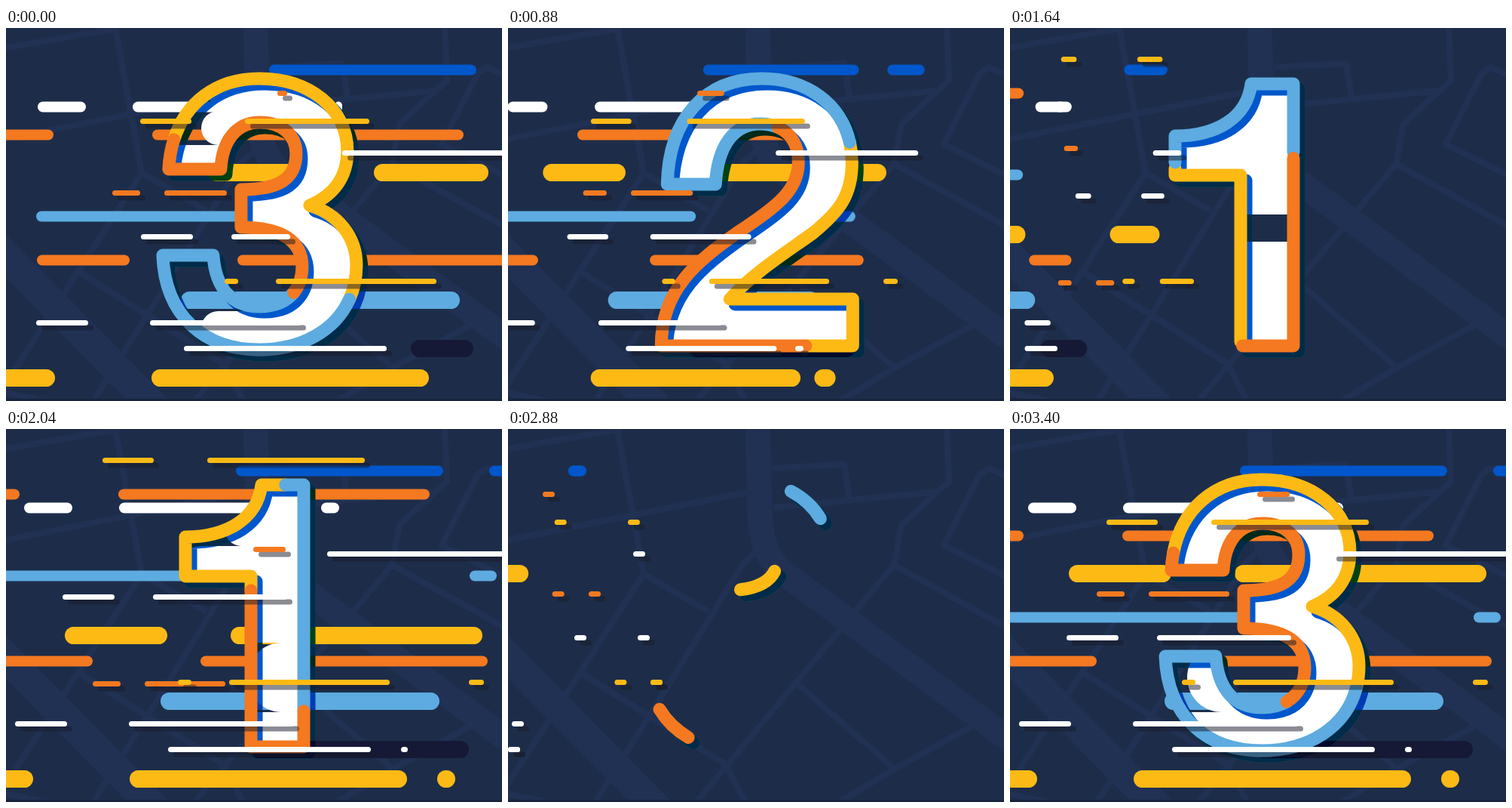
An HTML page with a canvas for the animation above (3440 ms loop, 658 by 494 pixels).

```html
<!DOCTYPE html>
<html lang="en">
<head>
<meta charset="utf-8">
<title>Countdown</title>
<style>
  html, body { margin: 0; width: 100%; height: 100%; overflow: hidden; background: #1d2d49; }
  canvas { display: block; width: 100vw; height: 100vh; }
</style>
</head>
<body>
<canvas id="stage" width="658" height="494"></canvas>
<script>
const W = 658, H = 494, STEP = 40, COUNT = 86;
const ctx = document.getElementById('stage').getContext('2d');

const NAVY = '#1d2d49', ROAD = '#203154', INK = '#161936';
const WHITE = '#ffffff', YELLOW = '#fdba15', ORANGE = '#f47920', SKY = '#5dabe0', BLUE = '#0057cb';
const THIN = 7, MID = 14, FAT = 23;

// Street map
const LANES = new Path2D(
  'M-5 27L150 0M145 0L180 192L266 242M-5 148L316 84M350 52L446 47L453 92' +
  'M352 104L570 83L585 70L582 -5M570 83L522 127L512 180L660 262' +
  'M512 180L250 494M660 195L578 154L626 60L638 52L660 62' +
  'M382 336L513 450L440 494M513 450L615 394M180 192L-4 476' +
  'M92 320L288 444L318 500M330 162L312 178L200 360L112 500M-5 482L60 496');
const AVENUE = new Path2D('M331 -5L334 110Q336 165 362 188L670 415');
const HIGHWAY = new Path2D('M-20 282L205 510');

// Numerals: outline, middle frame of its life, offset, where the first stroke starts
const DIGITS = [
  { mid: -1, dx: -2, base: -0.155, order: [YELLOW, SKY, ORANGE], lead: 0,
    d: 'M216 187C219 120 262 67 336 67C402 67 453 106 453 163C453 198 434 222 403 235' +
       'C440 246 465 276 465 314C465 382 410 426 336 426C262 426 211 380 208 301L275 301' +
       'C278 345 300 369 336 369C372 369 393 348 393 316C393 282 366 264 312 264L312 214' +
       'C362 214 385 200 385 166C385 141 365 125 337 125C305 125 287 150 285 187Z' },
  { mid: 25, dx: -10, base: 0.086, order: [YELLOW, ORANGE, SKY], lead: 0,
    d: 'M227 207C229 120 277 67 352 67C425 67 472 115 472 178C472 222 455 243 421 271' +
       'C385 297 340 325 310 359L473 359L473 421L219 421C219 345 268 308 320 271' +
       'C374 236 401 214 401 178C401 147 382 127 350 127C316 127 294 155 291 207Z' },
  { mid: 51, dx: 0, base: 0.473, order: [YELLOW, SKY, ORANGE], lead: 85, alt: true,
    d: 'M395 74L395 421L325 421L325 195L238 195L238 143C292 143 333 120 339 74Z' }
];
for (const g of DIGITS) {
  const p = document.createElementNS('http://www.w3.org/2000/svg', 'path');
  p.setAttribute('d', g.d);
  g.len = p.getTotalLength();
  g.path = new Path2D(g.d);
}

// The white fill slides through in bands, each with its own head start
const BAND_EDGES = [66, 110, 155, 247, 283, 375, 420];
const BAND_LEADS = [215, 205, 130, 62, 235, 205];

// Speed lines. bars: ends in the middle frame; from: where the dash is born;
// afterwards it runs v * k^p to the right, and no head passes stop
const ROWS = [];
function row(h, color, y, from, v, p, bars, stop = 1e4, alt = y) {
  const long = bars.reduce((a, b) => b[1] - b[0] > a[1] - a[0] ? b : a);
  for (const b of bars) b.push(from + 0.7 * Math.min(0, b[0] - long[0]));
  ROWS.push({ h, color, y, v, p, bars, stop, alt });
}
row(MID, BLUE, 55, 136, 44, 0.7, [[305, 580], [641, 700]]);
row(MID, WHITE, 104, 22, 18, 1.1, [[24, 88], [150, 360], [418, 442]], 446);
row(MID, ORANGE, 141, -60, 45, 1, [[-117, 18], [149, 562]], 1e4, 86);
row(FAT, YELLOW, 191, 116, 190, 0.47, [[78, 214], [298, 632]], 640, 273);
row(MID, SKY, 249, -70, 53, 1, [[-265, -165], [-13, 360], [615, 651]], 1e4, 194);
row(MID, ORANGE, 307, 2, 49, 1.35, [[-8, 115], [258, 639]]);
row(FAT, SKY, 360, -60, 27, 1.6, [[205, 575]], 602);
row(FAT, INK, 424, 12, 212, 0.5, [[325, 614]], 620);
row(FAT, YELLOW, 463, -35, 29, 1.55, [[-91, 36], [164, 532], [572, 596]], 597);
row(THIN, ORANGE, 86, 46, 32, 1, [[328, 371]], 373, 159);
row(THIN, YELLOW, 123, 159, 50, 0.9, [[128, 196], [267, 476]], 482, 41);
row(THIN, WHITE, 165, 166, 20, 1.6, [[426, 680]]);
row(THIN, ORANGE, 218, 107, 26, 0.7, [[115, 152], [184, 291]], 293, 337);
row(THIN, WHITE, 276, 172, 104, 0.35, [[75, 144], [195, 373]], 377, 222);
row(THIN, YELLOW, 335, 189, 62, 0.42, [[228, 246], [296, 509], [614, 634]], 640);
row(THIN, WHITE, 390, 5, 28, 1.3, [[12, 81], [163, 382]], 391);
row(THIN, WHITE, 424, 0, 21, 1.55, [[215, 484], [524, 533]], 505);

const smooth = v => (v = Math.max(0, Math.min(1, v))) * v * (3 - 2 * v);

function pill(x0, x1, y, h, color) {
  if (x1 - x0 < 2) return;
  ctx.fillStyle = color;
  ctx.beginPath();
  ctx.roundRect(x0, y - h / 2, x1 - x0, h, Math.min(h, x1 - x0) / 2);
  ctx.fill();
}

// Ends of one bar: a drifting dash, then growth, then the run to the right
function span(r, [x0, x1, from], k) {
  if (k > 0) {
    const run = r.v * k ** r.p + 60 * Math.max(0, k - 5);
    return [x0 + run, Math.min(x1 + run, Math.max(x1, r.stop))];
  }
  const dash = Math.max(16, 1.7 * r.h);
  const u = Math.max(0, (k + 11) / 11);
  const slide = 4 * (r.h - THIN) * Math.min(0, k + 11);
  return [from + (x0 - from) * u + slide, from + dash + (x1 - from - dash) * u + slide];
}

function drawBars(g, k, thin) {
  for (const r of ROWS) {
    if ((r.h === THIN) !== thin) continue;
    const y = g.alt ? r.alt : r.y;
    const ends = r.bars.map(b => span(r, b, k));
    if (thin) for (const [a, b] of ends) pill(a + 7, b + 7, y + 7, r.h, 'rgba(25,27,40,.5)');
    for (const [a, b] of ends) pill(a, b, y + 0.5, r.h, r.color);
  }
}

function road(path, width) {
  ctx.lineWidth = width;
  ctx.stroke(path);
}

function drawMap() {
  ctx.fillStyle = NAVY;
  ctx.fillRect(0, 0, W, H);
  ctx.strokeStyle = ROAD;
  ctx.lineJoin = 'round';
  road(LANES, 8);
  road(AVENUE, 33);
  road(HIGHWAY, 40);
  ctx.fillStyle = '#18243d';
  ctx.fillRect(0, 491, W, 3);
}

// Three dashes share the outline and travel clockwise; a tint draws all three at once
function outline(g, k, off, tint) {
  const grow = smooth((k + 13.8) / 4.2) * (1 - smooth((k - 4.4) / 4));
  if (grow <= 0) return;
  const turn = g.base + 0.42 * (1 - Math.exp(-(k + 12.8) / 8));
  const third = g.len / 3, len = third * grow;
  ctx.save();
  ctx.translate(g.dx + 1.9 * k + off, off);
  ctx.lineWidth = 17;
  ctx.lineCap = ctx.lineJoin = 'round';
  ctx.setLineDash([len, (tint ? third : g.len) - len]);
  for (const color of tint ? [tint] : [YELLOW, SKY, ORANGE]) {
    const mid = turn + (tint ? 0 : g.order.indexOf(color) / 3);
    ctx.lineDashOffset = len / 2 - mid * g.len;
    ctx.strokeStyle = color;
    ctx.stroke(g.path);
  }
  ctx.restore();
}

function drawFill(g, k) {
  if (k < -12 || k > 9) return;
  const shift = g.dx + 1.9 * k;
  ctx.save();
  ctx.translate(shift, 0);
  ctx.clip(g.path);
  ctx.translate(-shift, 0);
  BAND_LEADS.forEach((lead, i) => {
    const top = BAND_EDGES[i], bottom = BAND_EDGES[i + 1];
    const tail = lead + g.lead + 54 * k;
    const head = 2.2 * lead - 110 + g.lead + 150 * (k + 11);
    pill(tail, head, (top + bottom) / 2, bottom - top, WHITE);
  });
  ctx.restore();
}

function draw(now) {
  const n = Math.floor(now / STEP + 0.01) % COUNT;
  const acts = DIGITS
    .map(g => [g, (n - g.mid + 20 + COUNT) % COUNT - 20])
    .filter(([, k]) => k >= -14 && k <= 16);
  const each = fn => acts.forEach(([g, k]) => fn(g, k));

  drawMap();
  // This tint turns dark teal under the multiplied shadow
  each((g, k) => outline(g, k, 7, 'rgb(0,126,92)'));
  each((g, k) => drawBars(g, k, false));
  each(drawFill);
  ctx.globalCompositeOperation = 'multiply';
  each((g, k) => outline(g, k, 7, BLUE));
  ctx.globalCompositeOperation = 'source-over';
  each((g, k) => outline(g, k, 0));
  each((g, k) => drawBars(g, k, true));
}

function loop(now) {
  draw(now);
  requestAnimationFrame(loop);
}
draw(0);
requestAnimationFrame(loop);
</script>
</body>
</html>
```
